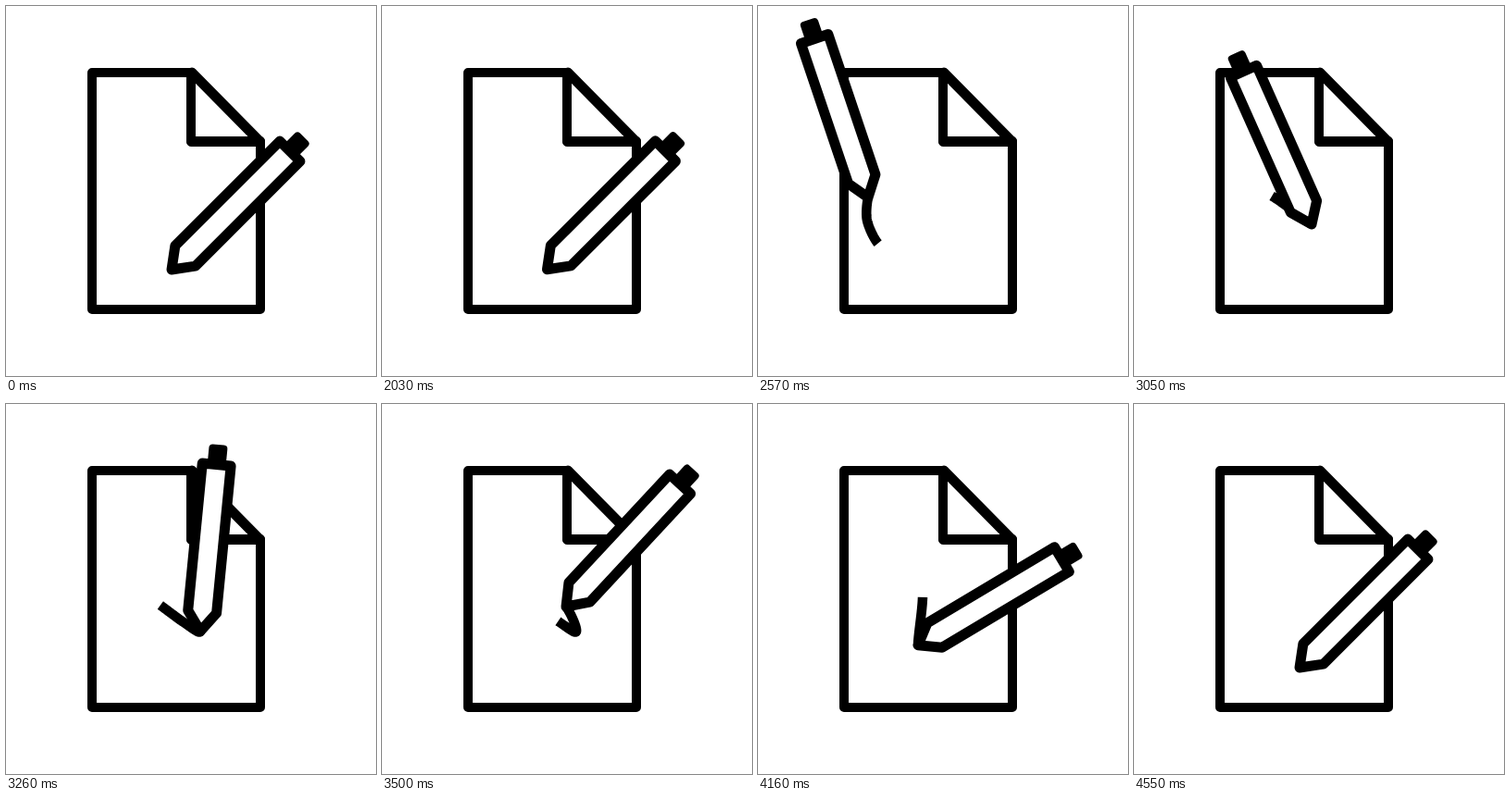
Recreate the animation shown at these times as an HTML page with a canvas. Size 400x400 px, loop 4.64 s.

```html
<!DOCTYPE html>
<html lang="en">
<head>
<meta charset="utf-8">
<title>Writing pen</title>
<style>
  html, body { margin: 0; width: 100%; height: 100%; overflow: hidden; background: #fff; }
  canvas { display: block; width: 400px; height: 400px; }
</style>
</head>
<body>
<canvas id="stage" width="400" height="400"></canvas>
<script>
const ctx = document.getElementById('stage').getContext('2d');
const LOOP = 4640, START = 2000, END = 4550, STEP = 30, TRAIL = 52;

// Turning points of the handwriting: time, x, y
const strokes = [
  [START, 179, 285],
  [2390, 131, 258],
  [2490, 118, 232],
  [2570, 119, 207],
  [2700, 126, 197],
  [2860, 150, 206],
  [3050, 192, 236],
  [3250, 210, 246],
  [3500, 199, 219],
  [3760, 174, 194],
  [3890, 178, 208],
  [4170, 173, 262],
  [END, 179, 285]
];
const last = strokes.length - 1;

const clamp = v => Math.min(1, Math.max(0, v));
const ease = (t, from, to) => (1 - Math.cos(Math.PI * clamp((t - from) / (to - from)))) / 2;

// The pen swings left, then right past its resting lean, then settles
function leanAt(t) {
  return 45 - 80 * ease(t, 2030, 2800) + 96 * ease(t, 2850, 3760) - 16 * ease(t, 4050, END);
}

function velocity(i, k) {
  if (i === 0 || i === last) return 0;
  const a = strokes[i - 1], b = strokes[i + 1];
  return (b[k] - a[k]) / (b[0] - a[0]);
}

// Smooth curve through the turning points
function tipAt(time) {
  const t = Math.min(END, Math.max(START, time));
  const i = Math.max(1, strokes.findIndex(p => p[0] >= t)) - 1;
  const a = strokes[i], b = strokes[i + 1], span = b[0] - a[0];
  const u = (t - a[0]) / span, u2 = u * u, u3 = u2 * u;
  return [1, 2].map(k =>
    a[k] + (3 * u2 - 2 * u3) * (b[k] - a[k]) +
    span * ((u3 - 2 * u2 + u) * velocity(i, k) + (u3 - u2) * velocity(i + 1, k)));
}

function trace(points, closed) {
  ctx.beginPath();
  points.forEach(([x, y]) => ctx.lineTo(x, y));
  if (closed) ctx.closePath();
}

function outline(points, closed, width, fill) {
  trace(points, closed);
  if (fill) {
    ctx.fillStyle = fill;
    ctx.fill();
  }
  ctx.lineWidth = width;
  ctx.stroke();
}

function drawPage() {
  outline([[201, 72], [93, 72], [93, 328], [275, 328], [275, 146]], false, 10);
  outline([[200, 72], [200, 146]], false, 10);
  outline([[200.5, 146.5], [274.5, 146.5], [201, 72]], false, 11);
}

// Ink of limited length that follows the tip and runs out at the end
function drawInk(t) {
  let left = TRAIL * clamp((4480 - t) / 320);
  if (t <= 2030 || left <= 0) return;
  const points = [tipAt(t)];
  for (let s = t - 5; s >= START && left > 0; s -= 5) {
    const [x, y] = points[points.length - 1], next = tipAt(s);
    left -= Math.hypot(next[0] - x, next[1] - y);
    points.push(next);
  }
  outline(points, false, 10.5);
}

function drawPen(t) {
  const w = 15.5, shoulder = -21, top = -181;
  ctx.save();
  ctx.translate(...tipAt(t));
  ctx.rotate(leanAt(t) * Math.PI / 180);
  outline([[-6, top], [6, top], [6, -198.5], [-6, -198.5]], true, 8, '#000');
  outline([[0, 0], [w, shoulder], [w, top], [-w, top], [-w, shoulder]], true, 11, '#fff');
  ctx.restore();
}

function draw(time) {
  const t = Math.floor((time % LOOP - 20) / STEP) * STEP + 20;
  ctx.fillStyle = '#fff';
  ctx.fillRect(0, 0, 400, 400);
  ctx.strokeStyle = '#000';
  ctx.lineJoin = ctx.lineCap = 'round';
  drawPage();
  ctx.lineCap = 'butt';
  drawInk(t);
  drawPen(t);
}

const begin = performance.now();
function tick() {
  draw(performance.now() - begin);
  requestAnimationFrame(tick);
}
tick();
</script>
</body>
</html>
```
